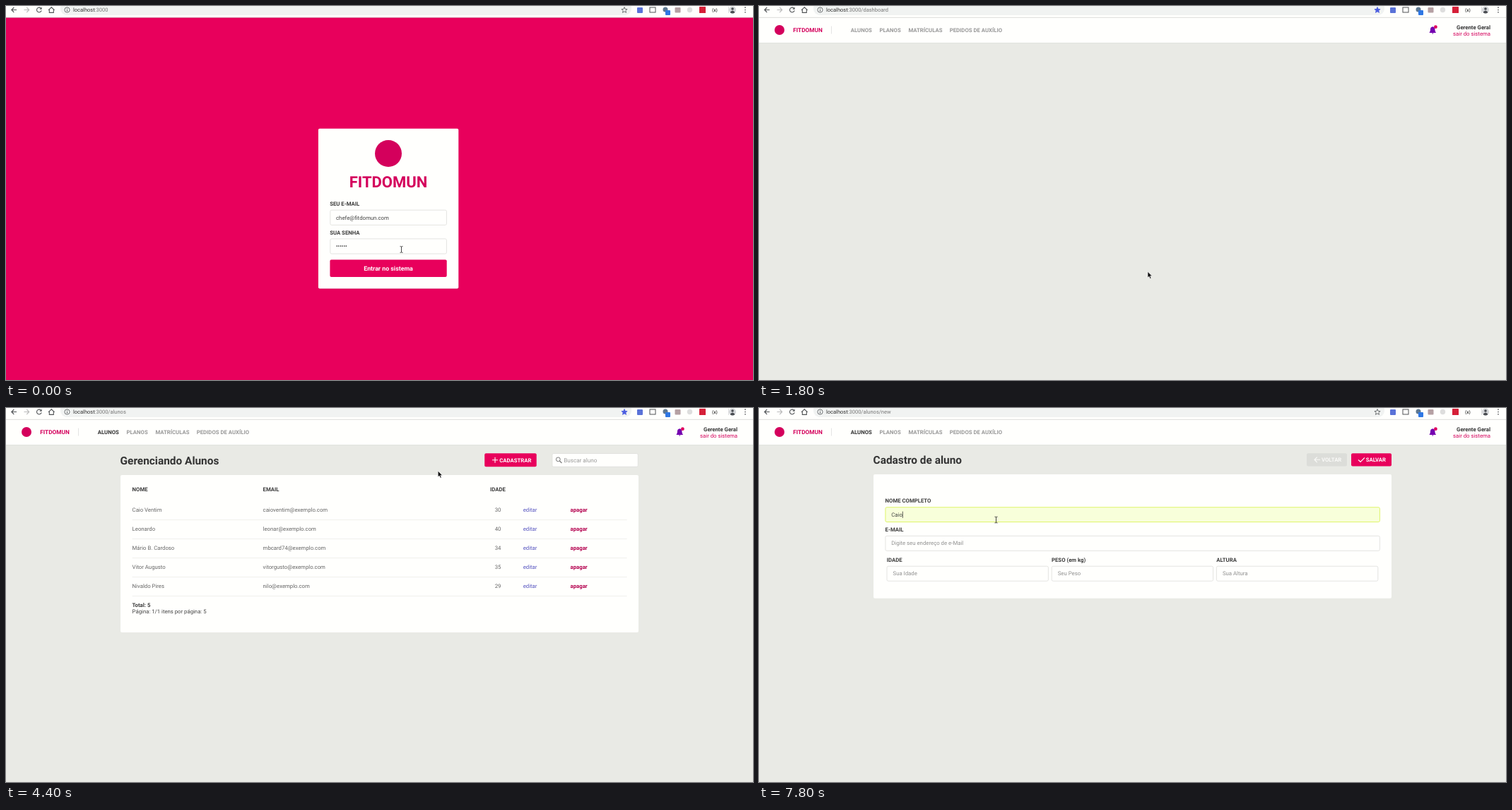
Recreate the animation shown at these times as an HTML page. Size 1057 px wide and 530 px high, loop 8000 ms.

```html
<!DOCTYPE html>
<html lang="pt-BR">
<head>
<meta charset="utf-8">
<title>Gerenciando Alunos</title>
<style>
html, body { margin: 0; width: 100%; height: 100%; overflow: hidden; background: #fffffd; }
svg { display: block; width: 1057px; height: 530px; font-family: Roboto, sans-serif; font-size: 7.75px; text-rendering: geometricPrecision; }
</style>
</head>
<body>
<svg id="stage" viewBox="0 0 1057 530"></svg>
<script>
const LOOP = 8000, STEP = 100;
const PINK = '#e8005c', HOVER = '#e3004e', ROSE = '#d4005c', WHITE = '#fffffd';
const BRAND = 'FITDOMUN';
const stage = document.getElementById('stage');

const text = (x, y, s, fill = '#444', extra = '') => `<text x="${x}" y="${y}" fill="${fill}" ${extra}>${s}</text>`;
const bold = (x, y, s, fill = '#3c3c3c', extra = '') => text(x, y, s, fill, 'font-weight="700" ' + extra);
const rect = (x, y, w, h, fill, r = 0, extra = '') =>
  `<rect x="${x}" y="${y}" width="${w}" height="${h}" rx="${r}" fill="${fill}" ${extra}/>`;
const circle = (x, y, r, fill, extra = '') => `<circle cx="${x}" cy="${y}" r="${r}" fill="${fill}" ${extra}/>`;
const line = (d, stroke, w = 1) => `<path d="${d}" fill="none" stroke="${stroke}" stroke-width="${w}"/>`;
const shape = (d, fill, extra = '') => `<path d="${d}" fill="${fill}" ${extra}/>`;
const field = (x, y, w, h, fill = WHITE, stroke = '#dededb') =>
  rect(x, y, w, h, fill, 2, `stroke="${stroke}" stroke-width=".8"`);
const MIDDLE = 'text-anchor="middle"', END = 'text-anchor="end"';

// Pointer path: time, x, y
const path = [
  [500, 559.5, 345], [1000, 552, 383], [1300, 550, 376.5], [2100, 550, 376.5],
  [2600, 240, 130], [2900, 126, 50], [3000, 138, 38], [3200, 142, 37], [3500, 142, 37],
  [4200, 556, 92], [4700, 694, 85], [4800, 694, 85], [5400, 713, 74], [5600, 713, 74],
  [6200, 311, 156], [6300, 313, 156.5], [6600, 313, 156.5], [6900, 335.5, 158.5]
];

function pointer(t) {
  const i = path.findIndex(p => p[0] > t);
  if (i === 0) return path[0].slice(1);
  if (i < 0) return path[path.length - 1].slice(1);
  const [t0, x0, y0] = path[i - 1], [t1, x1, y1] = path[i];
  const k = (t - t0) / (t1 - t0);
  return [x0 + (x1 - x0) * k, y0 + (y1 - y0) * k];
}

const cursors = {
  arrow: shape('M0 0V8.6L2 6.8L3.4 10L5 9.3L3.6 6.2H6.3Z', '#111', 'stroke="#fff" stroke-width=".6"'),
  hand: shape('M-.8 .4Q0-.6 .8 .4V3.3L5 4.3Q5.8 4.7 5.6 6L4.8 9.4H.3L-2 6.2Q-2 5-.8 5.7Z', '#111', 'stroke="#fff" stroke-width=".6"'),
  beam: line('M-2-4.3H-.6L0-3.8L.6-4.3H2M0-4V4M-2 4.3H-.6L0 3.8L.6 4.3H2', '#333', .9)
};

function toolbar(route, starred) {
  const ink = '#505356';
  const star = [...Array(10).keys()].map(i => {
    const r = i % 2 ? 1.9 : 4.3, a = i * Math.PI / 5;
    return (875 + r * Math.sin(a)).toFixed(2) + ' ' + (5.9 - r * Math.cos(a)).toFixed(2);
  }).join('L');
  return rect(0, 0, 1057, 16, '#fffffd') + rect(0, 15.9, 1057, .7, '#cfcfcd') + rect(77, -6, 808, 19, '#f1f3f2', 9) +
    line('M15 5.5H8M11.3 2L7.8 5.5L11.3 9', ink, 1.1) +
    line('M25.5 5.5H32.5M29.2 2L32.7 5.5L29.2 9', '#bbb', 1.1) +
    line('M49.4 3.2A3.4 3.4 0 1 0 50.2 6.4', ink, 1.1) + shape('M50.6 1.6V4.8H47.4Z', ink) +
    line('M60 5.8L64.3 1.8L68.6 5.8M61.3 5V9.4H67.3V5', ink, 1.1) +
    circle(86.5, 5.5, 3.6, 'none', `stroke="${ink}" stroke-width=".8"`) + line('M86.5 5V7.6M86.5 3.3V4.2', ink, .9) +
    `<text x="95" y="8.3" font-size="7.5" fill="#333">localhost<tspan fill="#777">:3000${route}</tspan></text>` +
    shape(`M${star}Z`, starred ? '#4a5ce0' : 'none', `stroke="${starred ? '#4a5ce0' : ink}" stroke-width=".8"`) +
    rect(893, 2, 8, 8, '#5a72d8', 1) + rect(911, 2, 8, 7, 'none', 0, `stroke="${ink}"`) +
    circle(933, 5, 3.5, '#5f7890') + rect(933, 6, 7, 7, '#2f77e4', 1) +
    rect(946.5, 2, 8, 7.5, '#b5a0a3', 1) + circle(967.5, 5.5, 3.7, '#dedede') +
    rect(981, 1, 9, 9, '#d51f38', .5) + bold(1003, 7.6, '(x)', '#444', MIDDLE + ' font-size="6.4"') +
    line('M1022.5 1V10', '#d5d5d5', .8) +
    circle(1028, 5.5, 5, '#d5d7da') + circle(1028, 4, 1.8, '#484b50') + shape('M1024.5 9Q1028 4 1031.5 9Q1028 12 1024.5 9Z', '#484b50') +
    [2.2, 5.5, 8.8].map(y => circle(1046, y, .85, ink)).join('');
}

function login(loading, hover) {
  return rect(0, 16, 1057, 514, PINK) +
    rect(441.9, 174.2, 198.4, 227, '#b00048', 2, 'opacity=".45"') + rect(441.9, 173.8, 198.4, 226.7, WHITE, 2) +
    circle(541, 209, 19, ROSE) + bold(541, 257.3, BRAND, ROSE, MIDDLE + ' font-size="22"') +
    bold(458.2, 282.8, 'SEU E-MAIL') + field(458.8, 289.2, 164.6, 21.2) +
    text(467, 302.5, 'chefe@fitdomun.com', '#444', 'font-size="7.8"') +
    bold(458.2, 323.6, 'SUA SENHA') + field(458.8, 329.9, 164.6, 21.2) + text(467, 342.9, '••••••', '#222') +
    rect(458.4, 359.6, 165.3, 24.5, hover ? HOVER : PINK, 2) +
    bold(541, 374.6, loading ? 'Carregando...' : 'Entrar no sistema', '#fff', MIDDLE + ' font-size="8.8"');
}

function header(active) {
  const menu = [[129.8, 'ALUNOS'], [170.6, 'PLANOS'], [211.4, 'MATRÍCULAS'], [269.7, 'PEDIDOS DE AUXÍLIO']];
  return rect(0, 16, 1057, 514, '#e9eae5') + rect(0, 16, 1057, 36, WHITE) +
    rect(0, 52, 1057, .6, '#dddeda') +
    circle(29, 34, 7, ROSE) + bold(48.3, 37.2, BRAND, ROSE, 'font-size="8.26"') + line('M102.5 28.5V39.5', '#ddd', .8) +
    menu.map(([x, s], i) => bold(x, 37.2, s, active && !i ? '#333' : '#999')).join('') +
    shape('M948.7 37.2Q950 36 950 33Q950 29.8 953.2 29.2Q956.4 29.8 956.4 33Q956.4 36 957.8 37.2V38H948.7ZM951.8 38.6H954.7Q953.2 40.8 951.8 38.6Z', '#7400b0') +
    circle(957.4, 29.7, 2.4, '#e0005c') +
    bold(1035, 33.1, 'Gerente Geral', '#333', END) + text(1035, 41.9, 'sair do sistema', ROSE, END);
}

const title = (y, s) => bold(161.6, y, s, '#333', 'font-size="15.4"');

const students = [
  ['Caio Ventim', 'caioventim@exemplo.com', 30],
  ['Leonardo', 'leonar@exemplo.com', 40],
  ['Mário B. Cardoso', 'mbcard74@exemplo.com', 34],
  ['Vitor Augusto', 'vitorgusto@exemplo.com', 35],
  ['Nivaldo Pires', 'nilo@exemplo.com', 29]
];

function list(hover) {
  const rows = students.map(([name, mail, age], i) => {
    const y = 147 + 27 * i;
    return text(178.6, y, name, '#666') + text(363.6, y, mail, '#666') + text(696, y, age, '#666', MIDDLE) +
      text(731.7, y, 'editar', '#5654c0') + bold(798.6, y, 'apagar', '#b4004e') +
      rect(178.6, y + 11, 700, .6, '#e6e6e3');
  }).join('');
  return title(79.5, 'Gerenciando Alunos') + rect(677.2, 64.3, 73.5, 19, hover ? HOVER : PINK, 2) +
    line('M688 73.8H696M692 69.8V77.8', '#fff', 1.1) + bold(698.3, 76.6, 'CADASTRAR', '#fff') +
    field(772.9, 64.5, 121.4, 18.8) + circle(781.3, 72.8, 2.9, 'none', 'stroke="#777"') + line('M783.4 75L786.4 78', '#777', 1.2) +
    text(789.2, 76.5, 'Buscar aluno', '#999', 'font-size="8.15"') +
    rect(162, 95, 733, 223, WHITE, 2) +
    bold(178.6, 118.4, 'NOME') + bold(363.6, 118.4, 'EMAIL') + bold(685, 118.4, 'IDADE') + rows +
    bold(178.6, 282, 'Total: 5') + text(178.6, 290.8, 'Página: 1/1 itens por página: 5');
}

function form(t) {
  const typed = 'Caio'.slice(0, [7300, 7400, 7700, 7800].filter(k => t >= k).length);
  const focused = t >= 6300, caret = focused && !(t >= 6800 && t < 7300);
  const caretSpot = [187.4, 192.6, 196.9, 198.8, 203.3][typed.length];
  const hint = (x, y, s) => text(x, y, s, '#909090', 'font-size="7.8"');
  const small = [[181, 'IDADE', 'Sua Idade'], [414.2, 'PESO (em kg)', 'Seu Peso'], [647.4, 'ALTURA', 'Sua Altura']];
  return title(79, 'Cadastro de aluno') +
    rect(775, 64.2, 57, 18.4, '#dcddd9', 2) + line('M794 73.3H786M789.7 69.6L786 73.3L789.7 77', '#fafaf8', 1.1) +
    bold(796, 76.1, 'VOLTAR', '#fafaf8') +
    rect(838, 64.2, 57, 18.4, PINK, 2) + line('M848 73.4L851 76.3L857 70.3', '#fff', 1.2) + bold(858.7, 76.1, 'SALVAR', '#fff') +
    rect(162, 94, 733, 175.8, WHITE, 2) +
    bold(178.6, 133.7, 'NOME COMPLETO') +
    (focused ? field(178.9, 140.7, 699.5, 20.8, '#f8ffda', '#d9f24c') : field(178.9, 140.7, 699.5, 20.8)) +
    (typed ? text(187.2, 153.6, typed, '#444', 'font-size="7.8"') : hint(187.2, 153.6, 'Digite seu nome completo')) +
    (caret ? line(`M${caretSpot} 146.6V155.8`, '#333', .8) : '') +
    bold(178.6, 174.6, 'E-MAIL') + field(178.9, 181.3, 699.5, 21) + hint(187.2, 194.3, 'Digite seu endereço de e-Mail') +
    small.map(([x, label, s]) => bold(x - .2, 217.5, label) + field(x, 224.2, 228.4, 21) + hint(x + 8.5, 237.4, s)).join('');
}

function draw(t) {
  const [x, y] = pointer(t);
  const over = (l, top, r, b) => x >= l && x <= r && y >= top && y <= b;
  let kind = 'arrow', page, route = '', starred = false;
  if (t < 1800) {
    const loading = t >= 1600, hover = over(458, 359, 624, 384);
    if (over(458, 329, 624, 352)) kind = 'beam';
    else if (hover && !loading) kind = 'hand';
    if (loading) { route = '/dashboard'; starred = true; }
    page = login(loading, hover);
  } else {
    page = header(t >= 3400);
    if (over(130, 28, 160, 42)) kind = 'hand';
    if (t < 3400) { route = '/dashboard'; starred = true; }
    else if (t < 5700) {
      const hover = over(677, 64, 751, 83);
      if (hover) kind = 'hand';
      route = '/alunos';
      starred = t >= 3500;
      page += list(hover);
    } else {
      if (over(178, 140, 879, 162)) kind = 'beam';
      route = '/alunos/new';
      page += form(t);
    }
  }
  stage.innerHTML = page + toolbar(route, starred) + `<g transform="translate(${x} ${y})">${cursors[kind]}</g>`;
}

let start = null, last = -1;
function tick(now) {
  if (start === null) start = now;
  const t = Math.floor((now - start) % LOOP / STEP) * STEP;
  if (t !== last) draw(last = t);
  requestAnimationFrame(tick);
}
draw(0);
requestAnimationFrame(tick);
</script>
</body>
</html>
```
